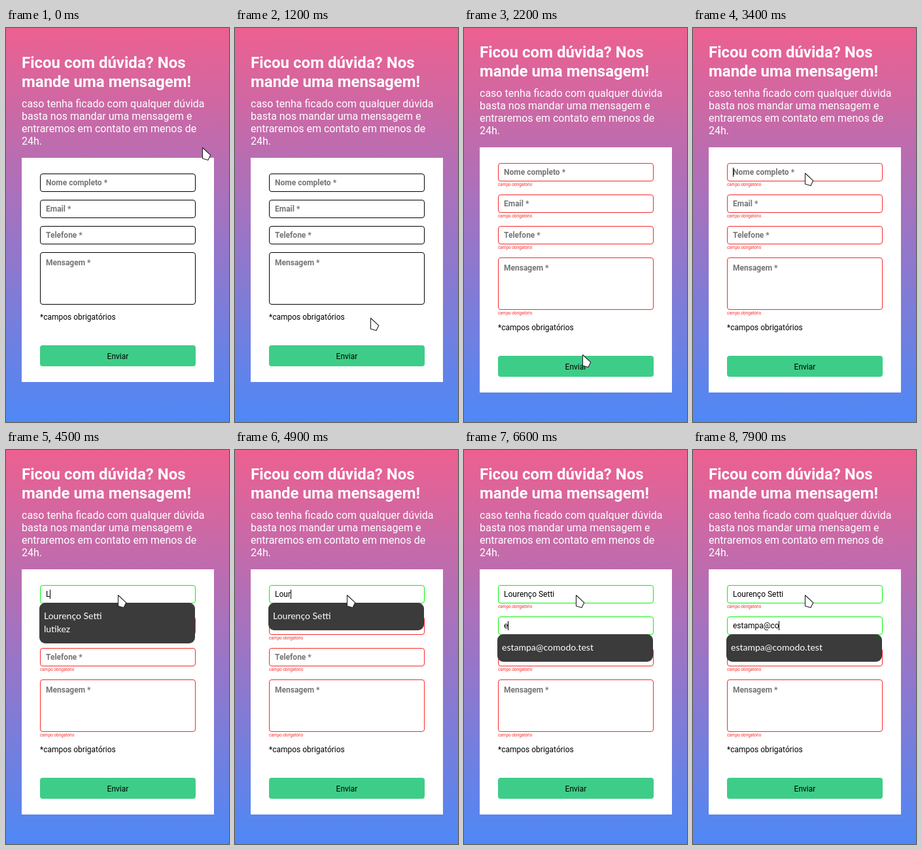
An HTML page for the animation above (8000 ms loop, 341 by 601 pixels).

```html
<!DOCTYPE html>
<html lang="pt-BR">
<head>
<meta charset="utf-8">
<title>Formulário de contato</title>
<style>
  html, body { margin: 0; width: 100%; height: 100%; overflow: hidden; }
  svg { display: block; width: 100vw; height: 100vh; }
  text { font-family: Roboto, sans-serif; font-size: 12px; white-space: pre; }
  .title { font-size: 24px; font-weight: 700; fill: #fff; }
  .lead { font-size: 16px; fill: #fff; }
  .hint { font-weight: 700; fill: #757575; }
  .error { font-size: 6.4px; fill: #fb2c2c; }
  .option { font-family: Lato, "Noto Sans", sans-serif; font-size: 14px; fill: #fff; }
</style>
</head>
<body>
<svg id="stage" viewBox="0 0 341 601">
  <defs>
    <linearGradient id="sky" x1="0" y1="0" x2="0" y2="1">
      <stop offset="0" stop-color="#ed6090"/>
      <stop offset="1" stop-color="#4e88f6"/>
    </linearGradient>
  </defs>
  <rect width="341" height="601" fill="url(#sky)"/>
</svg>
<script>
const LOOP = 8000;
const NAME = "Lourenço Setti";
const USER = "lutikez";
const MAIL = "estampa@comodo.test";

// [time, characters typed so far]
const nameKeys = [[4500, 1], [4600, 2], [4700, 3], [4900, 4], [5000, 5], [5100, 6], [5200, 7],
  [5400, 8], [5500, 9], [5700, 10], [5800, 11], [6000, 13], [6100, 14]];
const mailKeys = [[6600, 1], [6700, 2], [6800, 4], [7000, 5], [7200, 7], [7400, 8], [7700, 9], [7900, 10]];

// [time, x, y] of the pointer tip
const path = [[100, 300, 182], [300, 303, 192], [600, 280, 280], [1000, 224, 398], [1200, 207, 442],
  [1400, 187, 489], [1500, 180, 498], [1800, 180, 498], [1900, 184, 498], [2000, 181, 498],
  [2900, 181, 498], [3000, 171, 221]];

const stage = document.getElementById("stage");

function add(parent, tag, attrs, content) {
  const el = document.createElementNS("http://www.w3.org/2000/svg", tag);
  set(el, attrs);
  if (content !== undefined) el.textContent = content;
  parent.appendChild(el);
  return el;
}
function set(el, attrs) {
  for (const key in attrs) el.setAttribute(key, attrs[key]);
}
function show(el, on) {
  el.style.display = on ? "" : "none";
}
function label(parent, cls, x, y, content) {
  return add(parent, "text", { class: cls, x, y }, content);
}

const header = add(stage, "g", {});
["Ficou com dúvida? Nos", "mande uma mensagem!"].forEach((s, i) => label(header, "title", 24, 61 + 29 * i, s));
["caso tenha ficado com qualquer dúvida", "basta nos mandar uma mensagem e",
  "entraremos em contato em menos de", "24h."].forEach((s, i) => label(header, "lead", 24, 121 + 19 * i, s));

const card = add(stage, "rect", { x: 24, width: 294, fill: "#fff" });

const fields = ["Nome completo *", "Email *", "Telefone *", "Mensagem *"].map((s, i) => {
  const group = add(stage, "g", {});
  const height = i === 3 ? 80 : 28;
  const base = i === 3 ? 20 : 18;
  return {
    group,
    box: add(group, "rect", { x: 52.5, y: 0.5, width: 237, height: height - 1, rx: 3.5, fill: "#fff" }),
    hint: label(group, "hint", 61, base, s),
    value: label(group, "value", 61, base, ""),
    caret: add(group, "rect", { y: 7, width: 1, height: 14 }),
    error: label(group, "error", 52, height + 7, "campo obrigatório")
  };
});

const footer = add(stage, "g", {});
label(footer, "note", 52, 445, "*campos obrigatórios");
add(footer, "rect", { x: 52, y: 484, width: 238, height: 32, rx: 4, fill: "#3ecd88" });
set(label(footer, "send", 171, 505, "Enviar"), { "text-anchor": "middle" });

const popup = add(stage, "g", {});
const panel = add(popup, "rect", { x: 51, width: 238, rx: 9, fill: "#3b3b3b" });
const options = [25, 45].map(y => label(popup, "option", 58, y, ""));

const pointer = add(stage, "path", {
  d: "M.5 .5V17L9 19.5L12.8 11.8Z", fill: "#fff", stroke: "#222", "stroke-width": 1.1, "stroke-linejoin": "round"
});

function typed(keys, t) {
  let count = 0;
  for (const [time, n] of keys) if (t >= time) count = n;
  return count;
}

function pointerAt(t) {
  if (t <= path[0][0]) return path[0].slice(1);
  for (let i = 1; i < path.length; i++) {
    const [t0, x0, y0] = path[i - 1], [t1, x1, y1] = path[i];
    if (t <= t1) {
      const k = (t - t0) / (t1 - t0);
      return [Math.round(x0 + (x1 - x0) * k), Math.round(y0 + (y1 - y0) * k)];
    }
  }
  return path[path.length - 1].slice(1);
}

function drawField(field, content, focused, invalid) {
  field.value.textContent = content;
  show(field.hint, !content);
  show(field.error, invalid);
  set(field.box, { stroke: content ? "#0cf00c" : invalid ? "#f52a2a" : "#000" });
  show(field.caret, focused);
  if (focused) set(field.caret, { x: Math.floor(61 + (content ? field.value.getComputedTextLength() : 0)) });
}

function drawPopup(top, list) {
  show(popup, list.length > 0);
  set(popup, { transform: `translate(0 ${top})` });
  set(panel, { height: 22 + 20 * list.length });
  options.forEach((el, i) => el.textContent = list[i] || "");
}

function draw(t) {
  const invalid = t >= 2200;
  const shift = invalid ? 16 : 0;
  set(header, { transform: `translate(0 ${-shift})` });
  set(footer, { transform: `translate(0 ${shift})` });
  set(card, { y: 198 - shift, height: 342 + 2 * shift });

  const values = [NAME.slice(0, typed(nameKeys, t)), MAIL.slice(0, typed(mailKeys, t)), "", ""];
  const focus = t >= 6500 ? 1 : t >= 3400 && t < 6300 ? 0 : -1;
  fields.forEach((field, i) => {
    set(field.group, { transform: `translate(0 ${invalid ? 206 + 48 * i : 222 + 40 * i})` });
    drawField(field, values[i], i === focus, invalid);
  });

  if (t >= 6600) drawPopup(281, [MAIL]);
  else if (t >= 4500 && t < 6300) drawPopup(233, t < 4900 ? [NAME, USER] : [NAME]);
  else drawPopup(233, []);

  set(pointer, { transform: `translate(${pointerAt(t)})` });
}

function tick() {
  // the screen updates ten times a second
  draw(Math.floor((performance.now() % LOOP) / 100) * 100);
  requestAnimationFrame(tick);
}
tick();
</script>
</body>
</html>
```
